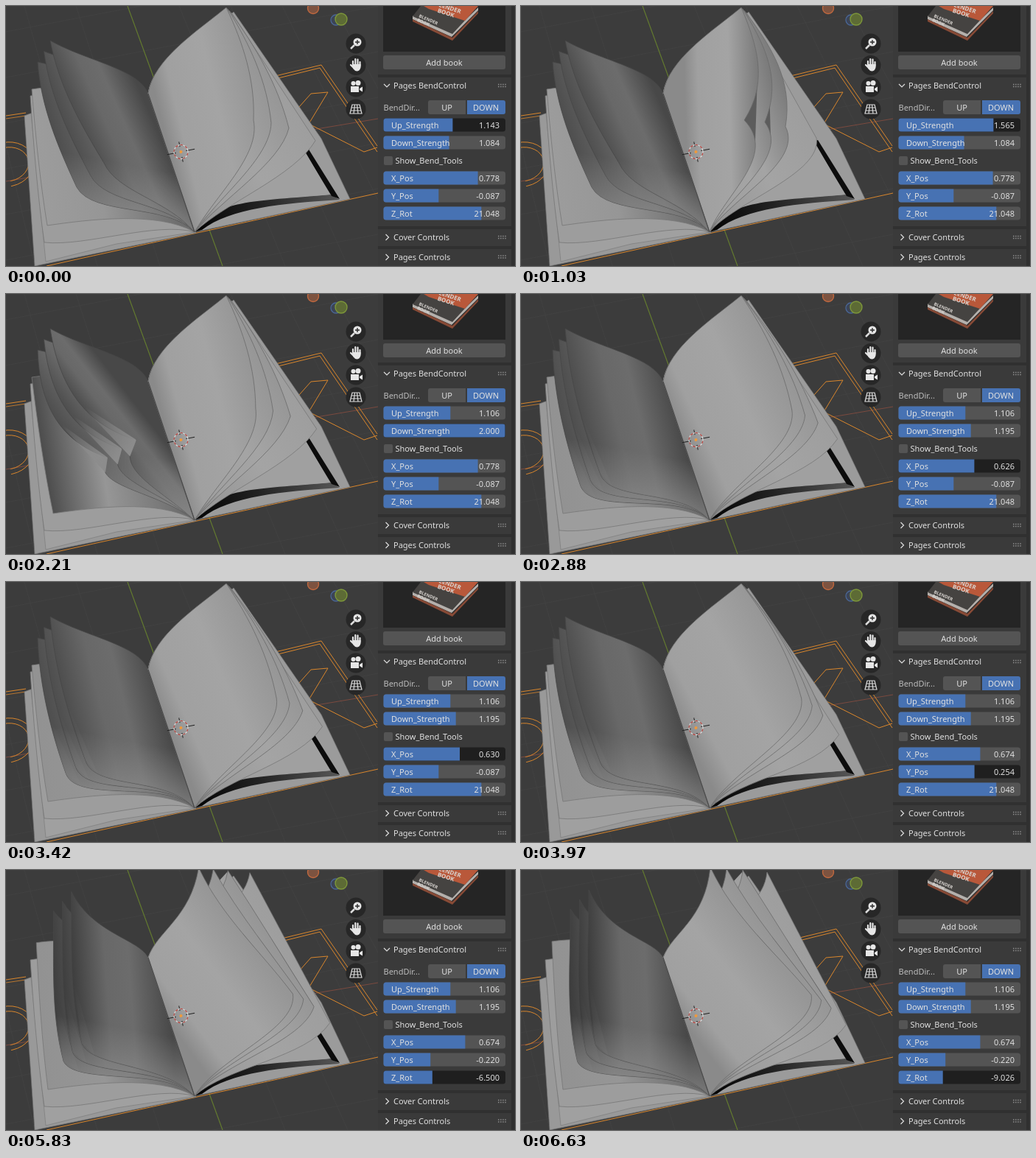
These frames come from a looping animation (691x353 px, 6.7 s). An HTML page with a canvas:

```html
<!DOCTYPE html>
<html lang="en">
<head>
<meta charset="utf-8">
<title>Pages bend control</title>
<style>
  html, body { margin: 0; width: 100%; height: 100%; overflow: hidden; background: #3c3c3c; }
  canvas, svg { position: absolute; left: 0; top: 0; }
  text { font: 11px "Noto Sans", "Open Sans", sans-serif; fill: #e0e0e0; }
  .mid { text-anchor: middle; }
  .end { text-anchor: end; }
  .box { fill: #545454; }
  .on { fill: #4772b3; }
  .sec { fill: #3a3a3a; }
  .line { fill: none; stroke: #dcdcdc; stroke-width: 1.2; }
  .cover { font-size: 8px; font-weight: 800; fill: #d8d4d0; }
  .small { font-size: 6px; }
</style>
</head>
<body>
<canvas id="view" width="691" height="353"></canvas>
<svg width="691" height="353" viewBox="0 0 691 353">
  <!-- view gizmos -->
  <circle cx="417" cy="3" r="7.5" fill="#7d5340" stroke="#c0683f" stroke-width="1.4"/>
  <circle cx="448" cy="19" r="7" fill="#3c4456" stroke="#4a6797" stroke-width="1.3"/>
  <circle cx="455" cy="18" r="8" fill="#5d6b35" stroke="#7d973a" stroke-width="1.4"/>
  <g fill="#272727">
    <circle cx="475" cy="51" r="13.5"/><circle cx="475" cy="80.5" r="13.5"/>
    <circle cx="475" cy="110" r="13.5"/><circle cx="475" cy="140" r="13.5"/>
  </g>
  <circle cx="477" cy="49" r="5.5" fill="#e6e6e6"/>
  <path class="line" d="M473 53l-5 5" style="stroke-width:2.5"/>
  <path d="M474 49h6M477 46v6" stroke="#272727" stroke-width="1.3"/>
  <path d="M471 80v-5M474.3 79v-7M477.5 79v-6.5M480.5 81v-5M468 80l4 4" stroke="#e6e6e6" stroke-width="2.2" stroke-linecap="round"/>
  <path d="M470 79h11.6v4q-1 5-5 5.500q-3 0-5-3z" fill="#e6e6e6"/>
  <g fill="#e6e6e6"><circle cx="471.5" cy="105" r="3"/><circle cx="478" cy="104.5" r="3.5"/><path d="M468 109h11v8h-11zM480 112l4-2.5v7l-4-2.5z"/></g>
  <path class="line" d="M470 134h10l3 12h-16zM469 138h12M468 142h14M473.5 134l-1.5 12M476.5 134l1.500 12"/>

  <!-- side panel -->
  <path d="M505 0h186v353H505z" fill="#303030"/>
  <path class="sec" d="M505 0h181v93H505zM505 97h181v202H505zM505 303h181v23H505zM505 330h181v23H505z"/>
  <path d="M512 0h166v62H512z" fill="#252525"/>
  <path d="M552 18L605 42L641 6V2L606 36L552 13z" fill="#b4b0ac"/>
  <path d="M563 0H641L606 38L552 14z" fill="#454341"/>
  <path d="M567 0H641L623 20L574 4z" fill="#b9583a"/>
  <path d="M552 18L606 43L641 7V10L606 47L552 21z" fill="#874a36"/>
  <g transform="translate(582 -1) rotate(18)"><text class="cover">BLENDER</text><text class="cover" x="6" y="8">BOOK</text></g>
  <g transform="translate(560 15) rotate(23)"><text class="cover small">BLENDER</text><text class="cover small" y="6">BOOK</text></g>
  <rect class="box" x="512" y="67" width="166" height="19" rx="3"/>
  <text class="mid" x="595" y="80.5">Add book</text>
  <path class="line" d="M513 106l4 4l4-4M515.5 310l4 4l-4 4M515.5 337l4 4l-4 4"/>
  <text x="526" y="112">Pages BendControl</text>
  <text x="526" y="318">Cover Controls</text>
  <text x="526" y="344.5">Pages Controls</text>
  <path d="M668 106.5h11M668 109.5h11M668 312.5h11M668 315.5h11M668 339h11M668 342h11" stroke="#8c8c8c" stroke-width="1.5" stroke-dasharray="1.5 1.6"/>
  <text x="512.5" y="141.5" style="fill:#bdbdbd">BendDir...</text>
  <path class="box" d="M576 128h48v19h-48q-3 0-3-3v-13q0-3 3-3z"/>
  <path class="on" d="M626 128h49q3 0 3 3v13q0 3-3 3h-49z"/>
  <text class="mid" x="598.5" y="141.5">UP</text>
  <text class="mid" x="651.5" y="141.5">DOWN</text>
  <rect class="box" x="513" y="204" width="12" height="12" rx="2"/>
  <text x="528.5" y="214">Show_Bend_Tools</text>
  <clipPath id="round"><rect x="512.5" y="152.5" width="165.5" height="18" rx="3.5"/></clipPath>
  <g id="fields"></g>
</svg>
<script>
const LOOP = 6700, TICKS = 98;
const ctx = document.getElementById('view').getContext('2d');
const grey = (v, a = 1) => `rgba(${v},${v},${v},${a})`;

// Sliders: label, row offset, value range, and drag keys as [tick, value]
const sliders = {
  up: { label: 'Up_Strength', dy: 0, lo: 0, hi: 2, keys: [[0, 1.143], [10, 2], [12, 2], [15, 1.565], [20, 1.106]] },
  down: { label: 'Down_Strength', dy: 24, lo: 0, hi: 2, keys: [[21, 1.084], [30, 2], [33, 2], [38, 1.195]] },
  x: { label: 'X_Pos', dy: 72, lo: 0, hi: 1, keys: [[39, .778], [42, .626], [46, .452], [51, .674]] },
  y: { label: 'Y_Pos', dy: 96, lo: -1, hi: 1, keys: [[53, -.087], [58, .254], [60, .33], [67, -.22]] },
  z: { label: 'Z_Rot', dy: 120, lo: -34.4, hi: 34.4, keys: [[68, 21.048], [74, 1.603], [81, -18], [89, 5], [97, -9.026]] }
};

function valueAt(keys, n) {
  if (n <= keys[0][0]) return keys[0][1];
  for (let i = 1; i < keys.length; i++) {
    const [a, va] = keys[i - 1], [b, vb] = keys[i];
    if (n <= b) return va + (vb - va) * (n - a) / (b - a);
  }
  return keys[keys.length - 1][1];
}

for (const s of Object.values(sliders)) {
  const g = document.createElementNS('http://www.w3.org/2000/svg', 'g');
  g.setAttribute('transform', `translate(0 ${s.dy})`);
  g.innerHTML = `<g clip-path="url(#round)"><rect x="512" y="152" width="167" height="19"/>
    <rect class="on" x="512" y="152" height="19"/></g>
    <text x="523" y="165.5">${s.label}</text><text class="end" x="670" y="165.5"></text>`;
  document.getElementById('fields').append(g);
  [s.back, s.bar] = g.querySelectorAll('rect');
  s.out = g.querySelector('.end');
}

function setSlider(s, n) {
  const v = valueAt(s.keys, n), active = n >= s.keys[0][0] && n <= s.keys[s.keys.length - 1][0];
  s.back.setAttribute('fill', active ? '#1f1f1f' : '#545454');
  s.bar.setAttribute('width', (166 * (v - s.lo) / (s.hi - s.lo) - .5).toFixed(1));
  s.out.textContent = v.toFixed(3);
  return v;
}

// A leaf hangs on the spine, top to foot. Its free edge runs from the top corner
// to the low corner and bows outwards by two sags.
const TOP = [193, 119], FOOT = [256, 307];
const add = ([x, y], dx, dy) => [x + dx, y + dy];

function cubic(pts, t) {
  const u = 1 - t, k = [u * u * u, 3 * u * u * t, 3 * u * t * t, t * t * t];
  return [0, 1].map(axis => k.reduce((sum, f, i) => sum + f * pts[i][axis], 0));
}

function leaf({ top, low, side, sag, topIn, topOut, lowOut, lowIn }) {
  const dx = low[0] - top[0], dy = low[1] - top[1], len = Math.hypot(dx, dy);
  const normal = [side * dy / len, -side * dx / len];
  const bow = i => add(top, dx * (i + 1) / 3 + normal[0] * sag[i], dy * (i + 1) / 3 + normal[1] * sag[i]);
  return {
    normal,
    head: [TOP, topIn, topOut, top],
    edge: [top, bow(0), bow(1), low],
    tail: [low, lowOut, lowIn, FOOT]
  };
}

// i counts leaves from the front; b, x, y, z are how far each control has moved.
function leftLeaf(i, { b, x, y, z }) {
  const top = [60 - 8.5 * i + (32 - 4 * i) * z, 47 + 14.5 * i - (20 + 1.5 * i) * z];
  const low = [
    133 - 18.5 * i + (44 - i) * b - (31 - 5.5 * i) * x - (10 - 2 * i) * y - (20 - 3.5 * i) * z,
    213 + 16.5 * i - (15 + 4.5 * i) * b + (32 - 7 * i) * x + (10 - 2.5 * i) * y + 7 * z
  ];
  return leaf({
    top, low, side: -1,
    sag: [14 + 21 * b - 6 * x - 10 * z, 8 + 38 * b - 4 * x + 4 * z],
    topIn: [180 + 2 * z, 85 + 3 * i + 10 * z], topOut: add(top, 50 - 24 * z, 28 - 8 * i + 33 * z),
    lowOut: add(low, 18 + 2 * i - 50 * b, 40 - 8 * z), lowIn: [220 - 12 * b, 263 + 2 * i]
  });
}

function rightLeaf(i, { b, x, y, z }) {
  const top = [299 + 2 * i + (20 * i - 42) * z, 2 + 2 * i - 6 * z];
  const low = [
    336 + 24 * i + (4 * i - 33) * b + (29 - 6 * i) * x + (22 - 5 * i) * y + (44 - 8 * i) * z,
    155 + 2 * i + 1.7 * i * i - i * b + (3 + 3 * i) * x + (1 + 4 * i) * y + (13 + 3 * i) * z
  ];
  const bow = 1 - (i / 3.5) ** 4;
  return leaf({
    top, low, side: 1,
    sag: [bow * (11 + 9 * b - (28 - 9 * i) * z), bow * (15 + 20 * b - 15 * z)],
    topIn: [200 + 5 * z, 72 + 13 * z], topOut: add(top, 32 * z - 39, 32 + 40 * z),
    lowOut: add(low, 10 - 11 * i + 37 * b, 48), lowIn: [285 + 4 * i - 10 * b, 256 + 3 * i]
  });
}

const flatLeaf = (top, low, drop) => leaf({
  top, low, side: -1, sag: [2, 3],
  topIn: [180, 100], topOut: add(top, 55, -8),
  lowOut: add(low, 56, -8 + drop), lowIn: [205, 278 + drop]
});

function outline(p) {
  ctx.beginPath();
  ctx.moveTo(...TOP);
  for (const [, a, b, c] of [p.head, p.edge, p.tail]) ctx.bezierCurveTo(...a, ...b, ...c);
  ctx.closePath();
}

function poly(pts, fill, stroke, width = 1) {
  ctx.beginPath();
  for (let i = 0; i < pts.length; i += 2) ctx.lineTo(pts[i], pts[i + 1]);
  if (fill) { ctx.closePath(); ctx.fillStyle = fill; ctx.fill(); }
  if (stroke) { ctx.strokeStyle = stroke; ctx.lineWidth = width; ctx.stroke(); }
}

function blend(from, to, stops) {
  const g = ctx.createLinearGradient(...from, ...to);
  stops.forEach(([at, color]) => g.addColorStop(at, color));
  return g;
}

// Shading runs square to the free edge: 0 at the rim, 1 at the spine.
function sheet(p, stops, edge) {
  const rim = cubic(p.edge, .5), [nx, ny] = p.normal;
  const reach = (225 - rim[0]) * nx + (213 - rim[1]) * ny;
  outline(p);
  ctx.fillStyle = blend(rim, add(rim, nx * reach, ny * reach), stops.map(([at, v]) => [at, grey(v)]));
  ctx.fill();
  ctx.strokeStyle = edge;
  ctx.lineWidth = .8;
  ctx.stroke();
}

function lowLight(p) {
  outline(p);
  ctx.fillStyle = blend([165, 215], [150, 295], [[0, grey(150, 0)], [1, grey(150, .7)]]);
  ctx.fill();
}

// Triangle at the low corner, from along the edge to along the tail
function corner(p, from, fill) {
  poly([...cubic(p.edge, from), ...p.tail[0], ...cubic(p.tail, .2)], fill);
}

function scene() {
  ctx.fillStyle = '#3c3c3c';
  ctx.fillRect(0, 0, 505, 353);
  for (let i = -3; i < 9; i++) {
    poly([70 * i + 25, 0, 85 * i + 124, 353], null, '#434343', .8);
    poly([0, 62 * i + 35, 505, 62 * i - 62], null, '#434343', .8);
  }
  poly([165, 0, 294, 353], null, '#62792f', 1.2);
  poly([0, 238, 505, 153], null, '#7b4a3f', 1);
  const orange = '#d9862c';
  poly([0, 149, 27, 145], null, orange);
  poly([0, 153, 27, 149], null, orange, .8);
  poly([345, 100, 428, 80, 504, 190], null, orange);
  poly([345, 104, 426, 84, 504, 198], null, orange);
  poly([504, 192, 486, 198, 411, 160, 437, 117, 414, 119, 390, 146], null, orange);
  poly([55, 353, 505, 254], null, orange);
  for (const r of [23, 30]) {
    ctx.beginPath();
    ctx.ellipse(2, 215, r + 6, r, -.2, -1.6, 1.6);
    ctx.stroke();
  }
}

function base() {
  poly([25, 149, 33, 146, 193, 125, 258, 308, 39, 353], '#999', '#777', .7);
  poly([...TOP, 309, 8, 428, 180, 467, 262, ...FOOT], '#9b9b9b', '#777', .7);
  poly([34, 146, 54, 347, 150, 323, ...FOOT, 193, 125], '#a0a0a0', '#7c7c7c', .7);
}

function pageBlock() {
  ctx.beginPath();
  ctx.moveTo(...FOOT);
  ctx.bezierCurveTo(285, 262, 335, 266, 440, 256);
  ctx.lineTo(453, 263);
  ctx.bezierCurveTo(375, 268, 305, 274, 266, 304);
  ctx.fillStyle = blend([262, 305], [450, 262], [[0, '#050505'], [.45, '#222'], [1, '#555']]);
  ctx.fill();
  poly([397, 184, 403, 182, 453, 262, 442, 258], '#0c0c0c');
  ctx.beginPath();
  ctx.moveTo(...TOP);
  ctx.lineTo(300, 3);
  ctx.lineTo(398, 184);
  ctx.lineTo(440, 256);
  ctx.bezierCurveTo(335, 264, 285, 262, ...FOOT);
  ctx.fillStyle = '#a0a0a0';
  ctx.fill();
}

function cursor() {
  ctx.save();
  ctx.translate(237.5, 198);
  ctx.rotate(-.2);
  for (let i = 0; i < 4; i++) {
    poly([7, 0, i % 2 ? 14 : 19, 0], null, '#222');
    ctx.rotate(Math.PI / 2);
  }
  for (const [color, shift] of [['#e8e8e8', 0], ['#c8403a', 3.5]]) {
    ctx.beginPath();
    ctx.arc(0, 0, 9.5, 0, 7);
    ctx.setLineDash([3.5, 3.5]);
    ctx.lineDashOffset = shift;
    ctx.strokeStyle = color;
    ctx.stroke();
  }
  ctx.setLineDash([]);
  ctx.beginPath();
  ctx.arc(0, 0, 2, 0, 7);
  ctx.fillStyle = '#ee9a3c';
  ctx.fill();
  ctx.restore();
}

function draw(n) {
  const v = {};
  for (const k in sliders) v[k] = setSlider(sliders[k], n);
  const curl = (v.up - 1.143) / .422;
  const move = {
    x: (.778 - v.x) / .152,
    y: (v.y + .087) / .341,
    z: Math.max(0, (21.048 - v.z) / 30.074) ** 1.3
  };
  const left = { ...move, b: (v.down - 1.084) / .916 };
  const right = { ...move, b: curl < 1 ? curl : 1 + (curl - 1) * .35 };

  scene();
  base();

  sheet(flatLeaf([33, 122], [52, 321], 14), [[0, 157], [1, 157]], '#777');
  sheet(flatLeaf([35 + 7 * move.z, 113 - 16 * move.z], [56 + 8 * left.b, 298], 0),
    [[0, 156 - 80 * left.b], [.45, 150], [1, 110]], '#777');
  for (let i = 2; i >= 0; i--) {
    const p = leftLeaf(i, left);
    sheet(p, [[0, 78 - 18 * Math.min(1, move.z)], [.35, 104], [.6, 108], [1, 72]], '#474747');
    lowLight(p);
    const lit = Math.max(0, Math.min(1, left.b));
    corner(p, .55, blend(cubic(p.edge, .6), p.edge[3], [[0, grey(140, 0)], [1, grey(140, lit)]]));
  }

  pageBlock();
  sheet(rightLeaf(3.5, right), [[0, 158], [.5, 164], [1, 150]], '#777');
  const dim = 150 - 28 * Math.max(0, Math.min(1, right.b));
  for (let i = 2; i >= 0; i--) {
    const p = rightLeaf(i, right);
    corner(p, .5, '#5c5c5c');
    sheet(p, [[0, dim], [.4, 164], [.82, 160], [1, 138]], '#6a6a6a');
  }
  poly([...TOP, ...FOOT], null, '#4a4a4a', 1.2);
  cursor();
}

let shown = -1;
function tick() {
  const t = performance.now() % LOOP;
  const n = Math.min(TICKS - 1, Math.floor(t / LOOP * TICKS + .2));
  if (n !== shown) draw(shown = n);
  requestAnimationFrame(tick);
}
tick();
</script>
</body>
</html>
```
